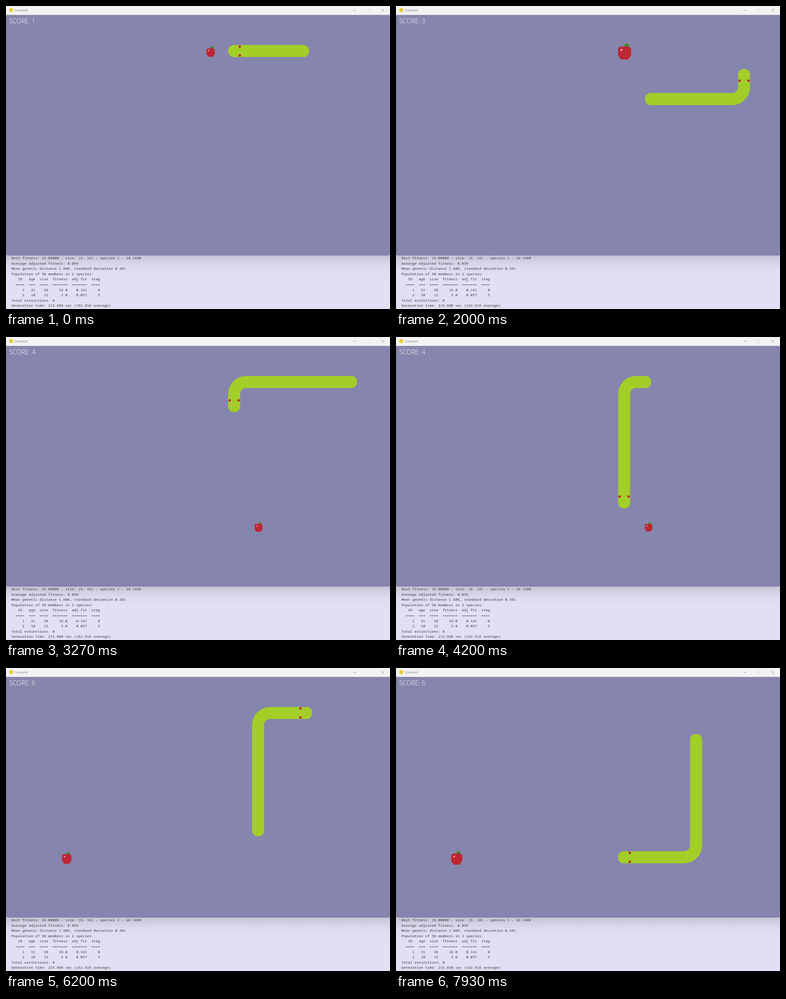
Recreate the animation shown at these times as an HTML page. Size 844x664 px, loop 8 s.

```html
<!DOCTYPE html>
<html lang="en">
<head>
<meta charset="utf-8">
<title>SnakeAI</title>
<style>
  html, body { margin: 0; width: 100%; height: 100%; overflow: hidden; background: #e2def3; }
  svg { display: block; }
  text { white-space: pre; }
  .title { font: 8px "Open Sans", sans-serif; fill: #858585; }
  .score { font: 300 14px "Open Sans", sans-serif; fill: #fff; }
  .log { font: 7.92px "Noto Sans Mono", monospace; fill: #3c3942; }
</style>
</head>
<body>
<svg width="844" height="664" viewBox="0 0 844 664">
  <defs>
    <linearGradient id="shadow" x2="0" y2="1">
      <stop offset="0" stop-color="#bfbcd0"/>
      <stop offset=".3" stop-color="#d2cee2"/>
      <stop offset=".6" stop-color="#dedaef"/>
      <stop offset="1" stop-color="#e2def3"/>
    </linearGradient>
  </defs>
  <rect y="542" width="844" height="50" fill="url(#shadow)"/>
  <g id="log" class="log"></g>

  <path d="M0 19H844V542Q844 546.5 839.5 546.5H4.5Q0 546.5 0 542Z" fill="#8585ad"/>
  <path d="M.5 19V542Q.5 546 4.5 546H839.5Q843.5 546 843.5 542" fill="none" stroke="#74749a"/>
  <rect width="844" height="19.5" fill="#f3f3f3"/>
  <circle cx="11.4" cy="9" r="4.6" fill="#e6cf3a"/>
  <text class="title" x="19" y="12">SnakeAI</text>
  <g fill="none" stroke="#858585" stroke-width=".8">
    <path d="M763.5 9.5H769.5M825 6.5L831 12.5M831 6.5L825 12.5"/>
    <rect x="794.5" y="7" width="5" height="5" stroke="#d8d8d8"/>
  </g>
  <text id="score" class="score" x="6.7" y="38"></text>

  <g id="apple">
    <path d="M-.5 -.22L-.44 -.32L-.3 -.4H.3L.44 -.32L.5 -.22V.24L.42 .4L.3 .56L.2 .6H-.2L-.3 .56L-.42 .4L-.5 .24Z" fill="#be2633"/>
    <path d="M.04 -.5H.12V-.36H.04Z" fill="#493c2b"/>
    <path d="M-.06 -.5L.04 -.6H.24L.38 -.48L.3 -.4H.2L.08 -.44Z" fill="#44891a"/>
    <path d="M-.28 -.08L-.18 -.18" stroke="#f4e6e8" stroke-width=".09"/>
  </g>
  <g fill="#a3ce27">
    <path id="body" fill="none" stroke="#a3ce27"/>
    <rect id="tail"/>
    <rect id="head"/>
  </g>
  <g fill="#be2633">
    <circle id="eyeA" r="2.7"/>
    <circle id="eyeB" r="2.7"/>
  </g>
</svg>
<script>
const CELL = 52.7, LEFT = 0.8, TOP = 19.5, HALF = CELL / 2;
const LOOP = 8000, FRAME = 200 / 3, PULSE = 3180;
const $ = id => document.getElementById(id);
const set = (el, attrs) => { for (const k in attrs) el.setAttribute(k, attrs[k]); };

const LOG = [
  'Best fitness: 16.00000 - size: (6, 18) - species 1 - id 1480',
  'Average adjusted fitness: 0.099',
  'Mean genetic distance 1.606, standard deviation 0.381',
  'Population of 50 members in 2 species:',
  '   ID   age  size  fitness  adj fit  stag',
  '  ====  ===  ====  =======  =======  ====',
  '     1   31    38     16.0    0.141     0',
  '     2   10    12      5.0    0.057     5',
  'Total extinctions: 0',
  'Generation time: 215.660 sec (162.816 average)'
];
LOG.forEach((line, i) => {
  const text = document.createElementNS('http://www.w3.org/2000/svg', 'text');
  set(text, { x: 12, y: 554.9 + i * 11.6 });
  text.textContent = line;
  $('log').append(text);
});

// The walk through the grid; dirs[i] is the heading with which cells[i] is entered.
const HEADING = { L: [-1, 0], R: [1, 0], U: [0, -1], D: [0, 1] };
const START = 3; // index in the walk of the head at step 0
const cells = [[12, 1]], dirs = [HEADING.L];
for (const leg of 'L4 D2 R6 U2 L5 D6 R1 U6 R2 D6 L3'.split(' ')) {
  const dir = HEADING[leg[0]];
  for (let n = +leg[1]; n > 0; n--) {
    const [x, y] = cells[cells.length - 1];
    cells.push([x + dir[0], y + dir[1]]);
    dirs.push(dir);
  }
}

const EATEN_AT = [1, 9, 16, 23, 31];
const APPLES = [[8, 1], [14, 3], [9, 1], [10, 7], [12, 1], [2, 7]];

const center = ([c, r]) => [LEFT + (c + 0.5) * CELL, TOP + (r + 0.5) * CELL];
// A point in a cell, moved from its centre along and across a heading (in cells).
function spot(i, [dx, dy], along, across = 0) {
  const [x, y] = center(cells[i]);
  return [x + (dx * along - dy * across) * CELL, y + (dy * along + dx * across) * CELL];
}

function drawSnake(step) {
  const head = step + START;
  const tail = head - 3 - EATEN_AT.filter(s => s < step).length;
  const headDir = dirs[head], tailDir = dirs[tail + 1];
  const tailEnd = spot(tail, tailDir, 0.125), headEnd = center(cells[head]);

  let d = `M${tailEnd}L${spot(tail, tailDir, 0.5)}`;
  for (let i = tail + 1; i < head; i++) {
    const a = dirs[i], b = dirs[i + 1];
    const turn = a[0] * b[1] - a[1] * b[0];
    d += (turn ? `A${HALF} ${HALF} 0 0 ${turn > 0 ? 1 : 0} ` : 'L') + spot(i, b, 0.5);
  }
  set($('body'), { d: `${d}L${headEnd}`, 'stroke-width': HALF });

  for (const [id, [x, y]] of [['tail', tailEnd], ['head', headEnd]])
    set($(id), { x: x - HALF / 2, y: y - HALF / 2, width: HALF, height: HALF, rx: 12 });
  for (const [id, side] of [['eyeA', -0.187], ['eyeB', 0.187]]) {
    const [cx, cy] = spot(head, headDir, -0.235, side);
    set($(id), { cx, cy });
  }
}

function drawApple(time, eaten) {
  const [x, y] = center(APPLES[eaten]);
  const size = 21.6 - 7.5 * Math.cos((time - 590) / PULSE * 2 * Math.PI);
  set($('apple'), { transform: `translate(${x + 0.9} ${y + 1.6}) scale(${size})` });
}

function draw(now) {
  const frame = Math.floor((now % LOOP + 3.4) / FRAME) % 120;
  const step = Math.floor((frame + 2) / 3);
  const eaten = EATEN_AT.filter(s => s <= step).length;
  $('score').textContent = `SCORE: ${eaten + 1}`;
  drawApple(frame * FRAME, eaten);
  drawSnake(step);
}

const begin = performance.now();
function tick() {
  draw(performance.now() - begin);
  requestAnimationFrame(tick);
}
tick();
</script>
</body>
</html>
```
